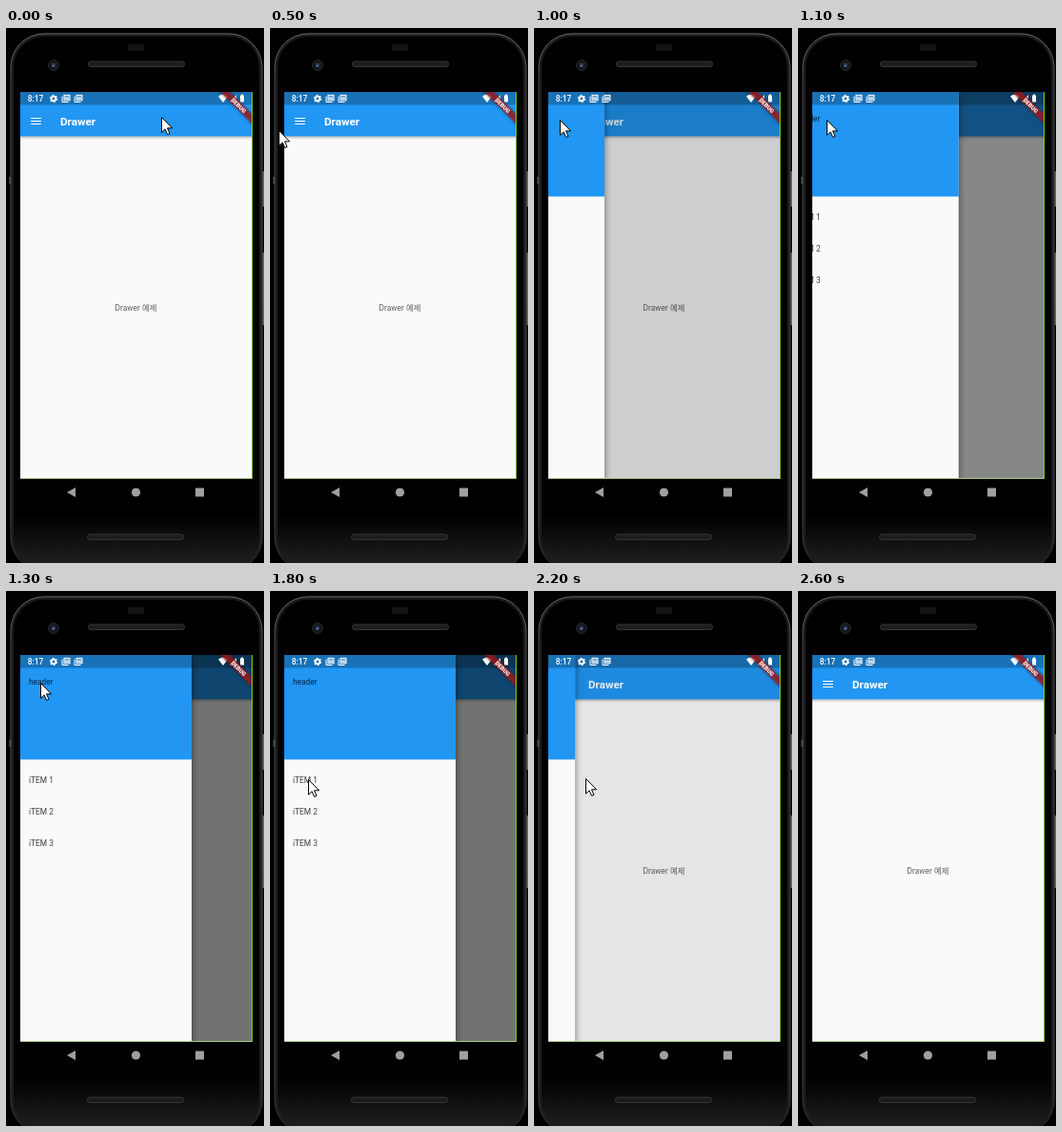
Recreate the animation shown at these times as an HTML page. Size 271 by 560 pixels, loop 3200 ms.

```html
<!DOCTYPE html>
<html lang="ko">
<head>
<meta charset="utf-8">
<title>Drawer</title>
<style>
  html, body { margin: 0; width: 100%; height: 100%; overflow: hidden; background: #000; }
  svg { display: block; width: 100vw; height: 100vh; }
  text { font: 8.4px Roboto, "Noto Sans CJK KR", "Noto Sans CJK", sans-serif; fill: rgba(0, 0, 0, .75); }
  .label { fill: rgba(0, 0, 0, .62); }
  .title { font-size: 11.7px; font-weight: 700; fill: #fff; }
  .clock { font-size: 8.4px; font-weight: 500; fill: #fff; }
  .debug { font-size: 6px; font-weight: 900; fill: #fff; }
</style>
</head>
<body>
<svg viewBox="0 0 271 560">
  <defs>
    <clipPath id="screen"><rect x="15" y="67" width="244" height="405"/></clipPath>
    <linearGradient id="edge" x2="0" y2="1">
      <stop offset="0" stop-color="#6e6c6d"/>
      <stop offset=".1" stop-color="#4a4849"/>
      <stop offset=".9" stop-color="#444"/>
      <stop offset="1" stop-color="#2a2a2a"/>
    </linearGradient>
    <linearGradient id="face" x2="0" y2="1">
      <stop offset=".9" stop-color="#000"/>
      <stop offset="1" stop-color="#222"/>
    </linearGradient>
    <filter id="soft" x="-50%" y="-50%" width="200%" height="200%"><feGaussianBlur stdDeviation="1.5"/></filter>
    <filter id="wide" x="-20%" y="-10%" width="140%" height="120%"><feGaussianBlur stdDeviation="3"/></filter>
  </defs>

  <!-- phone -->
  <g fill="#666">
    <rect x="3.5" y="156" width="2" height="7"/>
    <rect x="269.5" y="150" width="1.5" height="37"/>
    <rect x="269.5" y="235" width="1.5" height="76"/>
  </g>
  <rect x="5" y="6" width="264" height="562" rx="35" fill="#1c1b1c" stroke="url(#edge)"/>
  <rect x="8" y="9" width="258" height="556" rx="32" fill="url(#face)"/>
  <rect x="128" y="17" width="17" height="7" rx="2" fill="#141416"/>
  <circle cx="50" cy="39" r="5.5" fill="#17181c" stroke="#222328"/>
  <circle cx="50" cy="39" r="2.2" fill="#2c3f66"/>
  <circle cx="49.5" cy="39.5" r=".8" fill="#8796b8"/>
  <g fill="#1d1d1e" stroke="#353536">
    <rect x="86.5" y="35" width="101" height="5.5" rx="2.5"/>
    <rect x="85.5" y="530" width="101" height="5.5" rx="2.5"/>
  </g>
  <g fill="#a0a0a0">
    <path d="M64 486L73 481V491Z"/>
    <circle cx="136.5" cy="486" r="4.6"/>
    <rect x="199" y="481.5" width="9" height="9"/>
  </g>

  <g clip-path="url(#screen)">
    <!-- page -->
    <rect x="15" y="67" width="244" height="405" fill="#fafafa"/>
    <text class="label" x="136.5" y="296" text-anchor="middle">Drawer 예제</text>
    <rect x="12" y="69" width="250" height="45.5" opacity=".32" filter="url(#soft)"/>
    <rect x="15" y="67" width="244" height="46.3" fill="#2196f3"/>
    <path d="M26 94.5h11m-11 3h11m-11 3h11" stroke="#fff" stroke-width="1.2"/>
    <text class="title" x="57" y="102">Drawer</text>
    <rect id="scrim" x="15" y="67" width="244" height="405" opacity="0"/>

    <!-- drawer, drawn fully open -->
    <g id="drawer">
      <rect x="15" y="69" width="181" height="406" opacity=".4" filter="url(#wide)"/>
      <rect x="15" y="67" width="180" height="405" fill="#fafafa"/>
      <rect x="15" y="67" width="180" height="109.4" fill="#2196f3"/>
      <text x="24" y="98">header</text>
      <g id="items"></g>
    </g>

    <!-- status bar -->
    <rect x="15" y="67" width="244" height="13.4" opacity=".25"/>
    <text class="clock" x="22.7" y="77">8:17</text>
    <g fill="none" stroke="#fff">
      <circle cx="50" cy="74" r="2.3" stroke-width="1.8"/>
      <circle cx="50" cy="74" r="3.6" stroke-width="1.2" stroke-dasharray="1.9 1.87"/>
      <g id="cards"></g>
    </g>
    <g fill="#fff">
      <path d="M223 71.5Q228 67.5 233 71.5L228 78Z"/>
      <path d="M242 70V77.5H234.5Z"/>
      <path d="M246 70.5H247V69.5H249V70.5H250V77.5H246Z"/>
    </g>

    <!-- debug banner -->
    <g transform="translate(258.5 67) rotate(45)">
      <rect x="-26" y="16.5" width="52" height="7.1" opacity=".5" filter="url(#soft)"/>
      <rect x="-26" y="16.5" width="52" height="7.1" fill="#b71c1c" fill-opacity=".68"/>
      <text class="debug" y="22.2" text-anchor="middle">DEBUG</text>
    </g>

    <rect x="15" y="471" width="244" height="1" fill="#a9c987"/>
    <rect x="258" y="67" width="1" height="405" fill="#86d010"/>
  </g>

  <path id="cursor" d="M.5 .5V16.2L4.1 12.8 6.6 18.4 9 17.4 6.5 11.8H11.6Z" fill="#fff" stroke="#000"/>
</svg>
<script>
const LOOP = 3200, STEP = 100;
const DRAWER_W = 180, SCRIM = .54;
const OPEN_AT = 947.5, CLOSE_AT = 2051.5, LEAVE_AT = 2600;
const OMEGA = Math.sqrt(500) / 1000;

// time, x, y of the pointer tip
const path = [
  [0, 163, 93], [100, 115, 99], [200, 50, 109], [300, 16, 106], [400, 16, 106],
  [600, 2, 107], [700, 14, 101], [800, 27, 96], [1000, 27, 96], [1300, 36, 96],
  [1400, 36, 96], [1500, 48, 130], [1600, 54, 180], [1700, 48, 211], [1800, 40, 197],
  [2000, 40, 197], [2100, 44, 197], [2200, 54, 196], [2300, 70, 192], [2500, 90, 186]
];

const $ = id => document.getElementById(id);
const drawer = $('drawer'), scrim = $('scrim'), cursor = $('cursor');

$('items').innerHTML = [1, 2, 3]
  .map(n => `<text x="24" y="${167.8 + 33.2 * n}">iTEM ${n}</text>`).join('');
$('cards').innerHTML = [59, 72]
  .map(x => `<path d="M${x} 71.5V77.5H${x + 6.5}"/>
    <rect x="${x + 2}" y="70.3" width="6" height="5.4" fill="#fff" fill-opacity=".4"/>
    <path d="M${x + 3} 73.6H${x + 7}"/>`).join('');

// Remaining distance of a critically damped spring
function spring(ms) {
  if (ms <= 0) return 1;
  const a = OMEGA * ms, rest = (1 + a) * Math.exp(-a);
  return rest < .0036 ? 0 : rest;
}

function pointAt(t) {
  const i = path.findIndex(p => p[0] > t);
  if (i < 0) return path[path.length - 1].slice(1);
  const [t0, x0, y0] = path[i - 1], [t1, x1, y1] = path[i];
  const k = (t - t0) / (t1 - t0);
  return [x0 + (x1 - x0) * k, y0 + (y1 - y0) * k];
}

function draw(t) {
  const open = t < CLOSE_AT ? 1 - spring(t - OPEN_AT) : spring(t - CLOSE_AT);
  drawer.setAttribute('transform', `translate(${DRAWER_W * (open - 1)} 0)`);
  drawer.setAttribute('visibility', open ? 'visible' : 'hidden');
  scrim.setAttribute('opacity', SCRIM * open);
  const [x, y] = pointAt(t);
  cursor.setAttribute('transform', `translate(${Math.round(x)} ${Math.round(y)})`);
  cursor.setAttribute('visibility', t < LEAVE_AT ? 'visible' : 'hidden');
}

const start = performance.now();
function tick() {
  const t = (performance.now() - start) % LOOP;
  draw(Math.floor(t / STEP) * STEP);
  requestAnimationFrame(tick);
}
tick();
</script>
</body>
</html>
```
